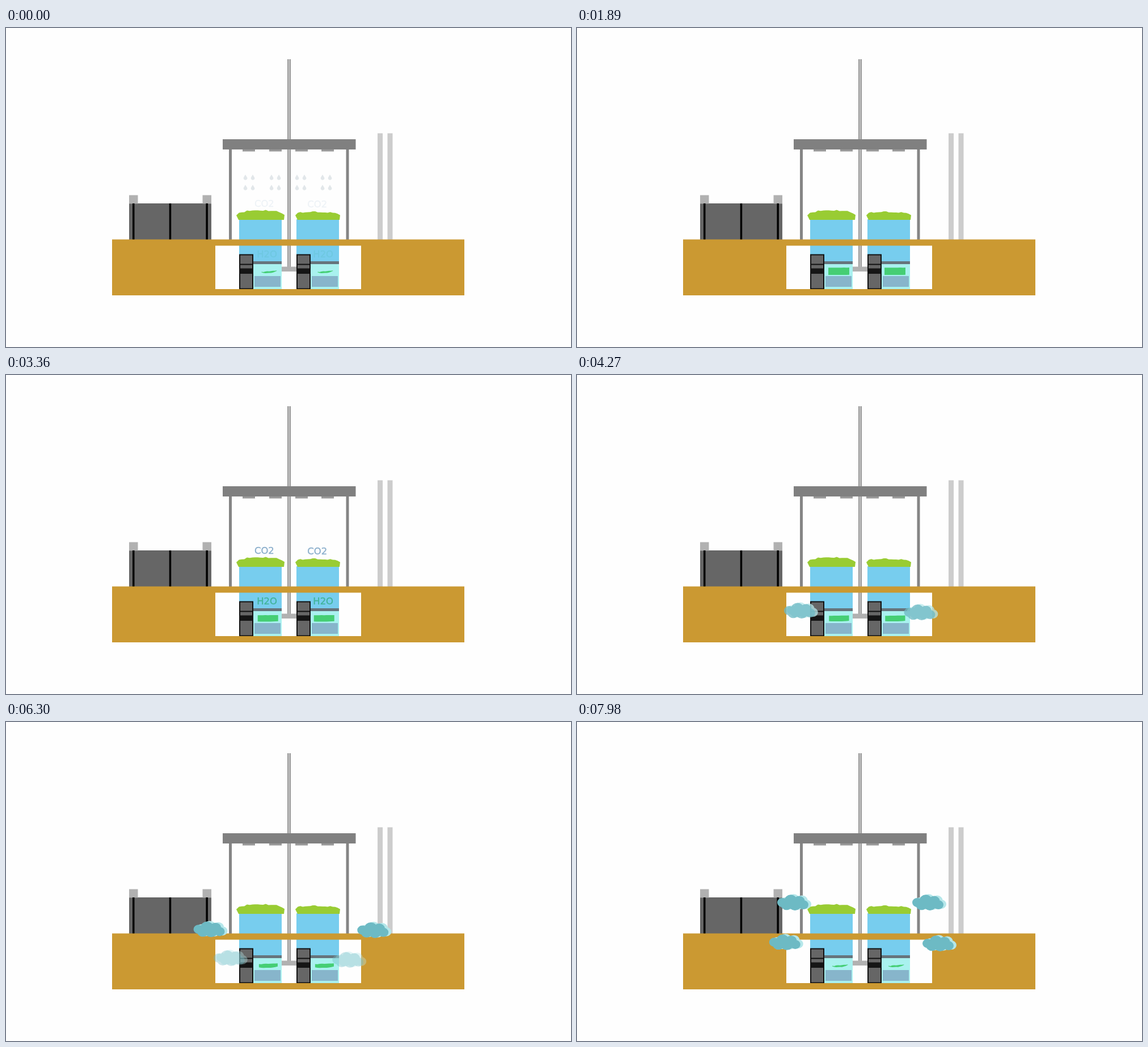
An HTML page with a canvas that plays this animation: 996 by 562 pixels, repeating every 8000 ms.

```html
<!DOCTYPE html>
<html lang="en">
<head>
<meta charset="utf-8">
<title>Aquaponic bench</title>
<style>
  html, body { margin: 0; width: 100%; height: 100%; overflow: hidden; background: #fefefe; }
  canvas { display: block; }
</style>
</head>
<body>
<canvas id="stage" width="996" height="562"></canvas>
<script>
  const DURATION = 8000;
  const ctx = document.getElementById("stage").getContext("2d");
  const clamp = v => Math.min(1, Math.max(0, v));
  const mix = (a, b, p) => a + (b - a) * p;

  function seeded(seed) {
    return () => (seed = seed * 16807 % 2147483647) / 2147483647;
  }

  function rect(color, x, y, w, h) {
    ctx.fillStyle = color;
    ctx.fillRect(x, y, w, h);
  }

  function polygon(color, points) {
    ctx.fillStyle = color;
    ctx.beginPath();
    points.forEach(([x, y]) => ctx.lineTo(x, y));
    ctx.fill();
  }

  function drawFrame() {
    for (const x of [417, 464, 510, 556]) rect("#999", x, 213, 22, 4.5);
    for (const x of [393, 599.5]) rect("#858585", x, 214, 5, 159);
    rect("#999", 496, 55, 6, 366);
    rect("#c8c8c8", 498, 55, 2, 366);
    rect("#b1b1b1", 486, 420.5, 26, 8.5);
    rect("#808080", 382, 196, 234.5, 18);
  }

  function drawBattery() {
    rect("#666", 217, 309, 145, 64);
    for (const x of [217, 346.5]) rect("#b1b1b1", x, 294.5, 15.5, 15);
    for (let i = 0; i < 3; i++) rect("#000", 223 + 64.7 * i, 309, 3.5, 64);
  }

  function drawTank(x) {
    rect("#77cdee", x, 337, 75, 123);
    rect("#a9f1ef", x + 24, 416, 51, 44);
    rect("#87b5cb", x + 27, 437, 46, 19);
    rect("#66747c", x + 24, 411, 51, 5);
    rect("#111", x, 398.5, 25, 62);
    rect("#666", x + 2, 400.5, 21, 58);
    rect("#111", x, 415.5, 25, 2);
    rect("#151515", x, 423.5, 25, 9.5);
  }

  function drawBench() {
    const wood = "#cb9932";
    rect(wood, 187, 372.5, 182, 98.5);
    rect(wood, 626, 372.5, 182, 98.5);
    rect(wood, 369, 372.5, 257, 11);
    rect(wood, 369, 460, 257, 11);
  }

  // ragged leaf line, highest in the middle
  function drawPlant(left, right, rise, seed) {
    const random = seeded(seed);
    const steps = 18;
    const leaves = [];
    for (let i = 0; i <= steps; i++) {
      const u = i / steps;
      leaves.push([mix(left, right, u), 330 - rise * Math.sqrt(Math.sin(Math.PI * u)) - 3 * random()]);
    }
    polygon("#99cc33", [[left + 4, 338], ...leaves, [right - 1, 338]]);
  }

  // a wavy strand that swells to a full box
  function drawFluid(left, fill) {
    const random = seeded(7);
    const wide = fill ** 0.35, high = fill ** 0.7;
    const edge = (u, side) => {
      const strandY = 8.5 - 3 * u ** 3 + side * (.4 + 1.2 * Math.sin(Math.PI * u)) + random() - .5;
      return [left + mix(8 + 26 * u, 37 * u, wide), 422 + mix(strandY, side > 0 ? 13 : 0, high)];
    };
    const points = [];
    for (let i = 0; i <= 8; i++) points.push(edge(i / 8, -1));
    for (let i = 8; i >= 0; i--) points.push(edge(i / 8, 1));
    polygon("#45ce74", points);
  }

  function drawDrop(x, y) {
    ctx.beginPath();
    ctx.moveTo(x, y - 5);
    ctx.lineTo(x + 3, y);
    ctx.arc(x, y + 1.2, 3.3, -.4, Math.PI + .4);
    ctx.fill();
  }

  // drops fall while the formulas fade in and out, twice per loop
  function drawRain(t) {
    const period = 1960;
    const elapsed = t + 60;
    if (elapsed >= 2 * period) return;
    const phase = elapsed % period;

    ctx.globalAlpha = clamp(phase / 300) * clamp((1400 - phase) / 300);
    ctx.fillStyle = "#78909b";
    for (const pair of [422, 468, 513, 558])
      for (const dx of [0, 13])
        for (const dy of [0, 18]) drawDrop(pair + dx, 262.5 + dy + .0123 * phase);

    ctx.globalAlpha = clamp(phase / 1000) * clamp((1900 - phase) / 900);
    label("CO2", "#2b6ca3", 438, 314.5);
    label("CO2", "#2b6ca3", 531.3, 316);
    label("H2O", "#16a056", 442.3, 404);
    label("H2O", "#16a056", 541.3, 404);
    ctx.globalAlpha = 1;
  }

  function label(text, color, x, y) {
    ctx.font = '16.4px "DejaVu Sans", sans-serif';
    ctx.lineWidth = .4;
    ctx.fillStyle = ctx.strokeStyle = color;
    ctx.fillText(text, x, y);
    ctx.strokeText(text, x, y);
  }

  function puffs(color, x, y) {
    ctx.fillStyle = color;
    ctx.beginPath();
    for (let i = 0; i < 6; i++) {
      const bulge = Math.sin(Math.PI * i / 5);
      const r = 8 + 2 * bulge;
      const cx = x + 9 + 7.4 * i;
      const cy = y + (i % 2 ? 19 : 15 - 4 * bulge);
      ctx.moveTo(cx + r + 1, cy);
      ctx.ellipse(cx, cy, r + 1, r, 0, 0, 2 * Math.PI);
    }
    ctx.fill();
  }

  // eased rise along a quadratic curve that bows outward
  function drawCloud(phase, startX, bowX, endX, startY) {
    if (phase < 0) return;
    const p = Math.sin(Math.PI / 2 * clamp(phase / 4220) ** 1.3) ** 2;
    const x = mix(mix(startX, bowX, p), mix(bowX, endX, p), p);
    const y = mix(startY, 303, p);
    ctx.globalAlpha = clamp(phase / 650);
    puffs("#b5e7ea", x + 5, y - 1);
    puffs("#6dbac4", x, y);
    ctx.globalAlpha = 1;
  }

  function draw(now) {
    const t = now % DURATION;
    const peak = 1950;
    const fill = t < peak ? t / peak : (DURATION - t) / (DURATION - peak);

    rect("#fefefe", 0, 0, 996, 562);
    drawFrame();
    drawBattery();
    for (const x of [655, 672.5]) rect("#ccc", x, 185.5, 9, 187.5);
    for (const x of [411, 512]) drawTank(x);
    for (const x of [443, 542]) drawFluid(x, fill);
    drawPlant(406, 491, 7.5, 11);
    drawPlant(510, 589, 5, 29);
    drawBench();
    drawRain(t);
    for (const start of [3780, 6060]) {
      drawCloud(t - start, 366, 302, 353, 401);
      drawCloud(t - start, 575, 655, 591, 404);
    }
    requestAnimationFrame(draw);
  }
  requestAnimationFrame(draw);
</script>
</body>
</html>
```
